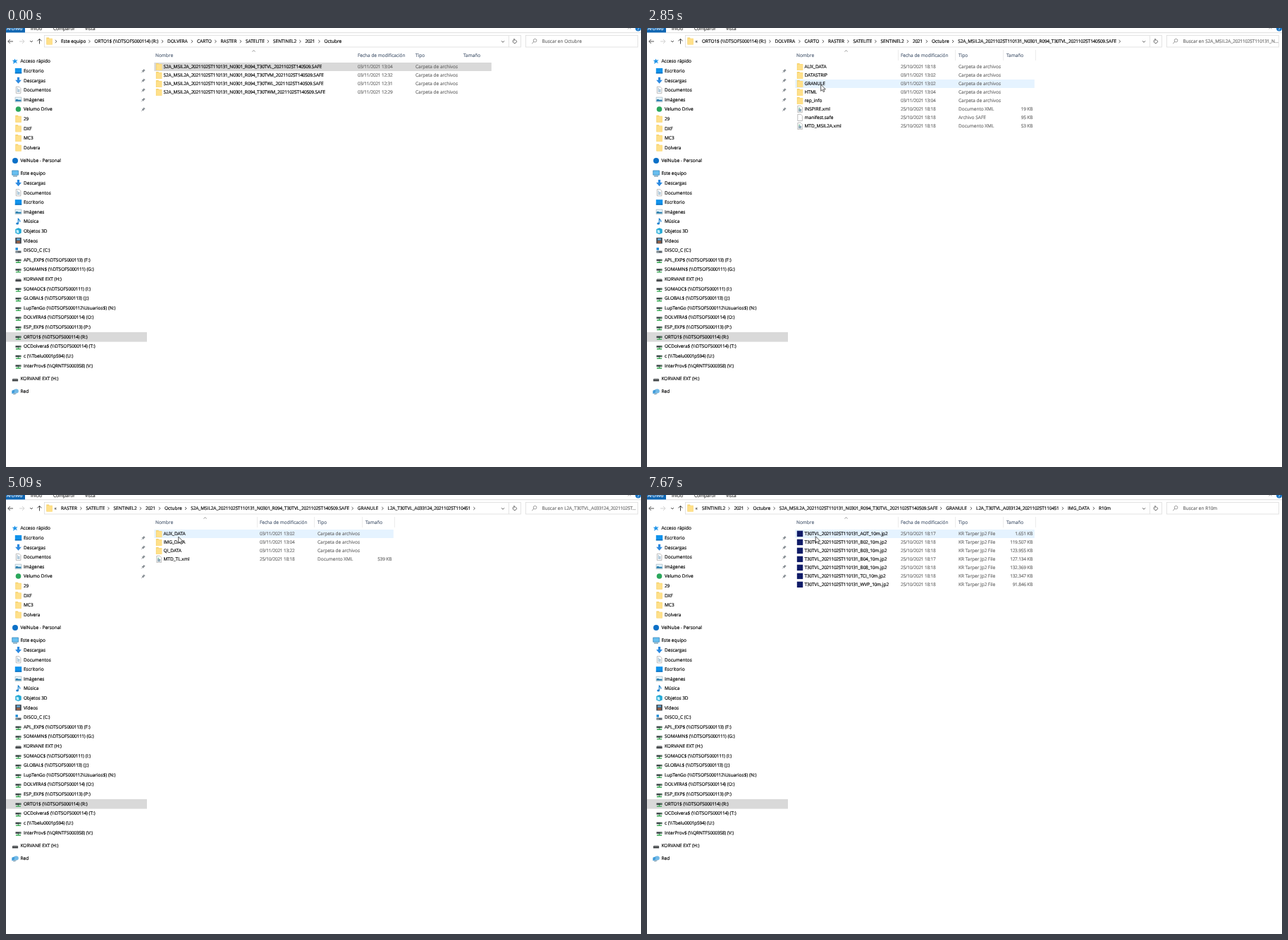
An HTML page that plays this animation: 901 by 622 pixels, repeating every 8000 ms.

```html
<!DOCTYPE html>
<html lang="es">
<head>
<meta charset="utf-8">
<title>Explorador</title>
<style>
  html, body { margin: 0; width: 100%; height: 100%; overflow: hidden; background: #fff; }
  svg { display: block; width: 100%; height: 100%; }
  text { font: 6.5px "Open Sans", "Noto Sans", sans-serif; text-rendering: geometricPrecision; white-space: pre; stroke-width: .16px; }
  .digits { letter-spacing: -.28px; }
</style>
</head>
<body>
<svg viewBox="0 0 901 622">
  <defs>
    <g id="folder"><path d="M-4.2-5h3.4l1 1.2h4V5h-8.4z" fill="#f6d26c"/><path d="M-3.4-3.4h7.6V5h-7.6z" fill="#ffe08a"/></g>
    <g id="page"><path d="M-3.2-4.6h4.4l2.2 2.2v7h-6.6z" fill="#fff" stroke="#a3a3a3" stroke-width=".7"/></g>
    <g id="xml"><use href="#page"/><path d="M-2 .8h4M-2 2.6h4" stroke="#557a91" stroke-width="1.2"/><path d="M-1.8-1.2h2.2" stroke="#35a270"/></g>
    <g id="raster"><path d="M-4.2-4.2h8.4v8.4h-8.4z" fill="#101c68"/></g>
    <g id="star"><path d="M-.8-3.6L.7-1.2 3.6-2 1.5.4 3 3.2.1 1.8-2.8 4-2.2.8-4.2-1.2-1.5-1.3z" fill="#2295e8"/></g>
    <g id="desktop"><path d="M-4.7-3.7h9.4v7.4h-9.4z" fill="#1193ec"/><path d="M-4.7 2.5h9.4v1.3h-9.4z" fill="#0868b6"/></g>
    <g id="download"><path d="M-1.6-4.5h3.2v4h2.8L0 4.6-4.4-.5h2.8z" fill="#2d8ae0"/></g>
    <g id="doc"><use href="#page"/><path d="M-1.8-2h1.4M-1.8 0h3.8M-1.8 2h3.8" stroke="#578caf" stroke-width=".9"/></g>
    <g id="image"><path d="M-4.4-3.3h8.8v6.6h-8.8z" fill="#e3f3fb" stroke="#9babb4" stroke-width=".6"/><path d="M-4 2.2V.2l2-1 2 1.2h4v1.8z" fill="#257baa"/></g>
    <g id="drivecloud"><circle r="3.8" fill="#2ba75b"/></g>
    <g id="cloud"><circle r="4" fill="#0b70c7"/></g>
    <g id="pc"><path d="M-4.3-4h8.8v6.3h-8.8z" fill="#67bff0" stroke="#3682b5" stroke-width=".7"/><path d="M-3 4h6" stroke="#5787a5" stroke-width="1.1"/></g>
    <g id="music"><path d="M-.2 3V-4.5C.2-2.2 3.2-2 2.2.8" fill="none" stroke="#147fce" stroke-width="1.2"/><ellipse cx="-1.4" cy="3" rx="1.9" ry="1.5" fill="#147fce"/></g>
    <g id="cube"><path d="M-4.2-2.6L0-4.3l4.2 1.7v5.5L0 4.5l-4.2-1.6z" fill="#20a8d5"/><path d="M-2.8-2L.8-1v4.3l-3.6-1z" fill="#c1eefb"/></g>
    <g id="film"><path d="M-4.2-4.2h8.4v8.4h-8.4z" fill="#3c444d"/><path d="M-2.4-3.3h4.8V-.4h-4.8z" fill="#63a4cf"/><path d="M-2.4.4h4.8v2.9h-4.8z" fill="#a26445"/></g>
    <g id="disk"><path d="M-4-3.6h3.4v3.4H-4z" fill="#1688d6"/><path d="M-4 .8h8v3h-8z" fill="#5d666d"/><path d="M-3 2.5h2" stroke="#cfe6ee" stroke-width=".8"/></g>
    <g id="net"><path d="M-4-.9h8v2.6h-8z" fill="#3f474a"/><path d="M1.8.4h1.2" stroke="#6ee27c"/><path d="M-3.6 3.8h7.2M0 1.7v2" stroke="#35a650" stroke-width="1.4"/></g>
    <g id="usb"><path d="M-4.1 1l1-1.3h6.2l1 1.3v2.6h-8.2z" fill="#45494b"/><path d="M-3.2.3h6.4" stroke="#b5b8ba" stroke-width=".8"/></g>
    <g id="network"><path d="M-4.7-1.2l6-2.4v5.4l-6 1.4z" fill="#3f9bd9"/><circle cx="1.8" cy="-.5" r="3" fill="#72b9e6"/><path d="M-2.7 3.9l4-1" stroke="#4a7893"/></g>
    <g id="pin"><path d="M.4-2.7l2.3 2.3-.9.2L.4 1.3l-.1 1.3-2.9-2.9 1.3-.1L.2-1.8z" fill="#848b91"/><path d="M-.9.9l-1.9 1.9" stroke="#848b91" stroke-width=".8"/></g>
    <path id="chev" d="M-1.2-2L.9 0-1.2 2" fill="none" stroke="#444" stroke-width=".9"/>
    <path id="down" d="M-2-1L0 1 2-1" fill="none" stroke="#444" stroke-width=".9"/>
  </defs>
  <g id="frame"></g>
  <g id="view"></g>
  <g id="arrow"><path d="M.2.2v9.2l2.1-2 1.5 3.2 1.6-.7-1.5-3.1h2.9z" fill="#fff" stroke="#222" stroke-width=".75"/></g>
  <circle id="ring" r="5.6" fill="none" stroke="#3597df" stroke-width="2"/>
</svg>
<script>
const LOOP = 8000, ROW_TOP = 49, ROW_H = 12;
const INK = '#000', DETAIL = '#6d6d6d', HEADING = '#56657a';
const $ = id => document.getElementById(id);
const text = (x, y, s, fill = INK, extra = '') =>
  `<text x="${x}" y="${y + 2.3}" fill="${fill}" stroke="${fill}" ${extra}>${s.replace(/\d+/g, '<tspan class="digits">$&</tspan>')}</text>`;
const rect = (x, y, w, h, fill, stroke = 'none') =>
  `<rect x="${x}" y="${y}" width="${w}" height="${h}" fill="${fill}" stroke="${stroke}" stroke-width=".8"/>`;
const line = (d, stroke, w = 1) => `<path d="${d}" fill="none" stroke="${stroke}" stroke-width="${w}"/>`;
const icon = (id, x, y) => `<use href="#${id}" x="${x}" y="${y}"/>`;

// Sidebar: the first entry of each group is its heading.
const sidebar = [
  [47, 'star|Acceso rápido', 'desktop|Escritorio', 'download|Descargas', 'doc|Documentos', 'image|Imágenes',
    'drivecloud|Velumo Drive', 'folder|29', 'folder|DXF', 'folder|MC3', 'folder|Dolvera'],
  [188, 'cloud|VelNube - Personal'],
  [206, 'pc|Este equipo', 'download|Descargas', 'doc|Documentos', 'desktop|Escritorio', 'image|Imágenes',
    'music|Música', 'cube|Objetos 3D', 'film|Vídeos', 'disk|DISCO_C (C:)',
    'net|APL_EXP$ (\\\\DTSOFS000113) (F:)', 'net|SOMAMN$ (\\\\DTSOFS000111) (G:)', 'usb|KORVANE EXT (H:)',
    'net|SOMAOC$ (\\\\DTSOFS000111) (I:)', 'net|GLOBAL$ (\\\\DTSOFS000113) (J:)',
    'net|LupTenGo (\\\\DTSOFS000112\\Usuarios$) (N:)', 'net|DOLVERA$ (\\\\DTSOFS000114) (O:)',
    'net|ESP_EXP$ (\\\\DTSOFS000113) (P:)', 'net|ORTO1$ (\\\\DTSOFS000114) (R:)',
    'net|OCDolvera$ (\\\\DTSOFS000114) (T:)', 'net|c (\\\\Tbelu0001p594) (U:)', 'net|InterProv$ (\\\\QRNTFS000358) (V:)'],
  [497, 'usb|KORVANE EXT (H:)'],
  [515, 'network|Red']
];

function drawFrame() {
  let s = rect(0, 0, 901, 622, '#fff') + rect(0, 0, 27, 6.5, '#1066b2');
  s += text(1, 1, 'Archivo', '#fff') + text(35, 1, 'Inicio', '#333') + text(67, 1, 'Compartir', '#333') + text(112, 1, 'Vista', '#333');
  s += line('M27 6.7H901', '#dedede') + line('M882.5 1.2l2-2 2 2', '#777', .8);
  s += '<circle cx="897" cy="0.5" r="4" fill="#1673c5"/>' + text(895.7, .7, '?', '#fff');
  s += line('M10 19H2.8M5.8 16l-3 3 3 3', '#444', .9) + line('M19 19h7M23 16l3 3-3 3', '#ccc', .9);
  s += icon('down', 36, 19) + line('M47.5 22.5v-7M44.5 18.4l3-3 3 3', '#444', 1);
  s += rect(54.5, 10.5, 676, 16.5, '#fff', '#dcdcdc') + line('M713.5 11v16', '#dedede', .8);
  s += icon('folder', 61.5, 18.5) + icon('down', 705, 19.3);
  s += line('M723.8 17.3a2.6 2.6 0 1 1-2.7-.8M721 14.8v2.2h2', '#444', .8);
  s += rect(737.5, 10.5, 159, 16.5, '#fff', '#dcdcdc');
  s += '<circle cx="750.6" cy="17.7" r="2.3" fill="none" stroke="#777" stroke-width=".7"/>' + line('M749 19.4l-2.8 2.8', '#777', .8);
  s += rect(0, 431, 200, 13.6, '#d9d9d9');
  for (const [top, ...items] of sidebar) items.forEach((item, i) => {
    const [kind, label] = item.split('|'), y = top + i * 13.61;
    s += icon(kind, i ? 17.5 : 13, y) + text(i ? 25 : 20.5, y, label);
    if (top === 47 && i > 0 && i < 6) s += icon('pin', 195, y);
  });
  $('frame').innerHTML = s;
}

// The address bar shows a slice of one long path.
const path = [['Este equipo', 0], ['ORTO1$ (\\\\DTSOFS000114) (R:)', 47.5], ['DOLVERA', 151], ['CARTO', 193],
  ['RASTER', 226.5], ['SATELITE', 262], ['SENTINEL2', 301], ['2021', 346.5], ['Octubre', 373.5],
  ['S2A_MSIL2A_20211025T110131_N0301_R094_T30TVL_20211025T140509.SAFE', 410.7], ['GRANULE', 647.3],
  ['L2A_T30TVL_A033124_20211025T110451', 690], ['IMG_DATA', 820], ['R10m', 864]];

const dir = (name, date) => `folder|${name}|${date}|Carpeta de archivos|`;
const xml = (name, size) => `xml|${name}|25/10/2021 18:18|Documento XML|${size} KB`;
const safe = (tile, time) => dir(`S2A_MSIL2A_20211025T110131_N0301_R094_${tile}_20211025T140509.SAFE`, '03/11/2021 ' + time);
const jp2 = (band, min, size) => `raster|T30TVL_20211025T110131_${band}_10m.jp2|25/10/2021 18:${min}|KR Tarper Jp2 File|${size} KB`;

const folders = {
  month: { first: 0, last: 8, search: 'Octubre', rows: [
    safe('T30TVL', '13:04'), safe('T30TVM', '12:32'), safe('T30TWL', '12:31'), safe('T30TWM', '12:29')] },
  safe: { first: 1, last: 9, search: 'S2A_MSIL2A_20211025T110131_N...', rows: [
    dir('AUX_DATA', '25/10/2021 18:18'), dir('DATASTRIP', '03/11/2021 13:02'), dir('GRANULE', '03/11/2021 13:02'),
    dir('HTML', '03/11/2021 13:04'), dir('rep_info', '03/11/2021 13:04'), xml('INSPIRE.xml', 19),
    'page|manifest.safe|25/10/2021 18:18|Archivo SAFE|95 KB', xml('MTD_MSIL2A.xml', 53)] },
  granule: { first: 2, last: 10, search: 'GRANULE', rows: [dir('L2A_T30TVL_A033124_20211025T110451', '03/11/2021 13:04')] },
  tile: { first: 4, last: 11, search: 'L2A_T30TVL_A033124_20211025T...', rows: [
    dir('AUX_DATA', '03/11/2021 13:02'), dir('IMG_DATA', '03/11/2021 13:04'), dir('QI_DATA', '03/11/2021 13:22'), xml('MTD_TL.xml', 539)] },
  img: { first: 5, last: 12, search: 'IMG_DATA', rows: ['R10m', 'R20m', 'R60m'].map(n => dir(n, '03/11/2021 13:04')) },
  r10: { first: 6, last: 13, search: 'R10m', rows: [
    jp2('AOT', 17, '1.651'), jp2('B02', 18, '119.507'), jp2('B03', 18, '123.955'), jp2('B04', 17, '127.134'),
    jp2('B08', 18, '132.369'), jp2('TCI', 18, '132.347'), jp2('WVP', 18, '91.846')] }
};

const GREY = '#d9d9d9', HOVER = '#e5f3ff', PICKED = '#cce8ff';
const steps = [
  { t: 0, at: 'month', sel: 0, fill: GREY },
  { t: 1370, at: 'month', sel: 0, fill: PICKED },
  { t: 1930, at: 'month', body: 'empty' },
  { t: 2010, at: 'month', body: 'busy' },
  { t: 2170, at: 'safe' },
  { t: 2390, at: 'safe', tail: true },
  { t: 3310, at: 'safe', tail: true, sel: 2, fill: PICKED },
  { t: 3550, at: 'safe', tail: true, body: 'empty' },
  { t: 3630, at: 'safe', tail: true, body: 'busy' },
  { t: 3710, at: 'granule' },
  { t: 3930, at: 'granule', tail: true },
  { t: 4470, at: 'granule', tail: true, sel: 0, fill: PICKED },
  { t: 4700, at: 'granule', tail: true, body: 'empty' },
  { t: 4780, at: 'granule', tail: true, body: 'busy' },
  { t: 4860, at: 'tile' },
  { t: 5090, at: 'tile', tail: true },
  { t: 6020, at: 'tile', tail: true, body: 'empty' },
  { t: 6100, at: 'tile', tail: true, body: 'busy' },
  { t: 6190, at: 'img' },
  { t: 6420, at: 'img', tail: true, first: 6 },
  { t: 7260, at: 'img', tail: true, first: 6, sel: 0, fill: PICKED },
  { t: 7580, at: 'img', tail: true, first: 6, body: 'empty' },
  { t: 7660, at: 'r10' }
];

// Pointer moves: start, end, number of captured positions, way points.
const moves = [
  [130, 910, 11, [704, 587], [590, 515], [510, 435], [435, 362], [385, 305], [350, 262], [332, 240], [313, 212], [304, 175], [301, 150], [301, 132]],
  [990, 1370, 6, [303, 115], [311, 85], [315, 68], [315.8, 61], [315.8, 55], [316, 51]],
  [1930, 2170, 4, [316, 52], [316, 56.5]],
  [2390, 2850, 7, [308, 59], [270, 71], [246.5, 80]],
  [3930, 4240, 5, [246, 76], [244.5, 59]],
  [5090, 5400, 5, [244.5, 59], [241, 85], [238, 102]],
  [5780, 5870, 2, [238, 86], [237.5, 71]],
  [6790, 6950, 3, [238, 67], [239, 58.5]]
];

function pointerAt(t) {
  const move = moves.filter(m => m[0] <= t).pop();
  if (!move) return null;
  const [start, end, count, ...pts] = move;
  const k = Math.min(count - 1, Math.floor((t - start) / (end - start) * (count - 1) + .02));
  const u = k / (count - 1) * (pts.length - 1), i = Math.min(pts.length - 2, Math.floor(u));
  return [0, 1].map(a => pts[i][a] + (pts[i + 1][a] - pts[i][a]) * (u - i));
}

function drawPath(folder, step) {
  const first = step.first ?? folder.first, shift = 78 - path[first][1];
  let s = first ? text(68.5, 18.3, '«', '#444') : icon('chev', 71, 19);
  for (let i = first; i <= folder.last; i++) {
    const x = path[i][1] + shift;
    if (i > first) s += icon('chev', x - 7, 19);
    s += text(x, 18.7, path[i][0]);
  }
  if (step.tail) s += icon('chev', path[folder.last + 1][1] + shift - 7, 19);
  return s + text(760.5, 18.7, 'Buscar en ' + folder.search, DETAIL);
}

function drawView(step, hover) {
  const folder = folders[step.at], wide = step.at === 'month' && step.body !== 'busy';
  const cols = wide ? [212, 499, 581, 649] : [212, 360, 442, 510];
  const width = wide ? 478.5 : 339.5, caret = wide ? 351.5 : 282.5;
  let s = drawPath(folder, step);
  ['Nombre', 'Fecha de modificación', 'Tipo', 'Tamaño'].forEach((h, i) => s += text(cols[i], 38.5, h, HEADING));
  s += line(`M${caret - 2} 33.6l2-2 2 2`, '#666', .7);
  if (!wide) for (const x of [356.5, 437.5, 505.5, 551.5]) s += line(`M${x} 31v15`, '#e8e8e8', .8);
  if (step.body === 'busy') return s + text(509.5, 58.5, 'Estamos trabajando en ello...', DETAIL);
  if (step.body === 'empty') return s;
  const bar = (i, fill, stroke) => rect(210.3, ROW_TOP + i * ROW_H, width, ROW_H, fill, stroke);
  if (hover >= 0 && hover !== step.sel) s += bar(hover, HOVER);
  if (step.sel >= 0) s += bar(step.sel, step.fill, step.fill === PICKED ? '#99d1ff' : 'none');
  folder.rows.forEach((row, i) => {
    const y = ROW_TOP + 6 + i * ROW_H - .1, [kind, name, date, type, size] = row.split('|');
    s += icon(kind, 217, y) + text(223.5, y, name) + text(cols[1], y, date, DETAIL) + text(cols[2], y, type, DETAIL);
    if (size) s += text(547.5, y, size, DETAIL, 'text-anchor="end"');
  });
  return s;
}

let shown = '';
function render() {
  const t = performance.now() % LOOP;
  const index = steps.findLastIndex(s => s.t <= t), step = steps[index];
  const pos = pointerAt(t);
  let hover = pos ? Math.floor((pos[1] - ROW_TOP) / ROW_H) : -1;
  if (hover >= folders[step.at].rows.length) hover = -1;
  const key = index + ':' + hover;
  if (key !== shown) $('view').innerHTML = drawView(step, hover);
  shown = key;
  const waiting = t >= 1680 && t < 1760;
  $('arrow').style.display = pos && !waiting ? '' : 'none';
  $('ring').style.display = waiting ? '' : 'none';
  if (pos) {
    $('arrow').setAttribute('transform', `translate(${pos})`);
    $('ring').setAttribute('transform', `translate(${pos[0]} ${pos[1] + 5})`);
  }
  requestAnimationFrame(render);
}

drawFrame();
render();
</script>
</body>
</html>
```
